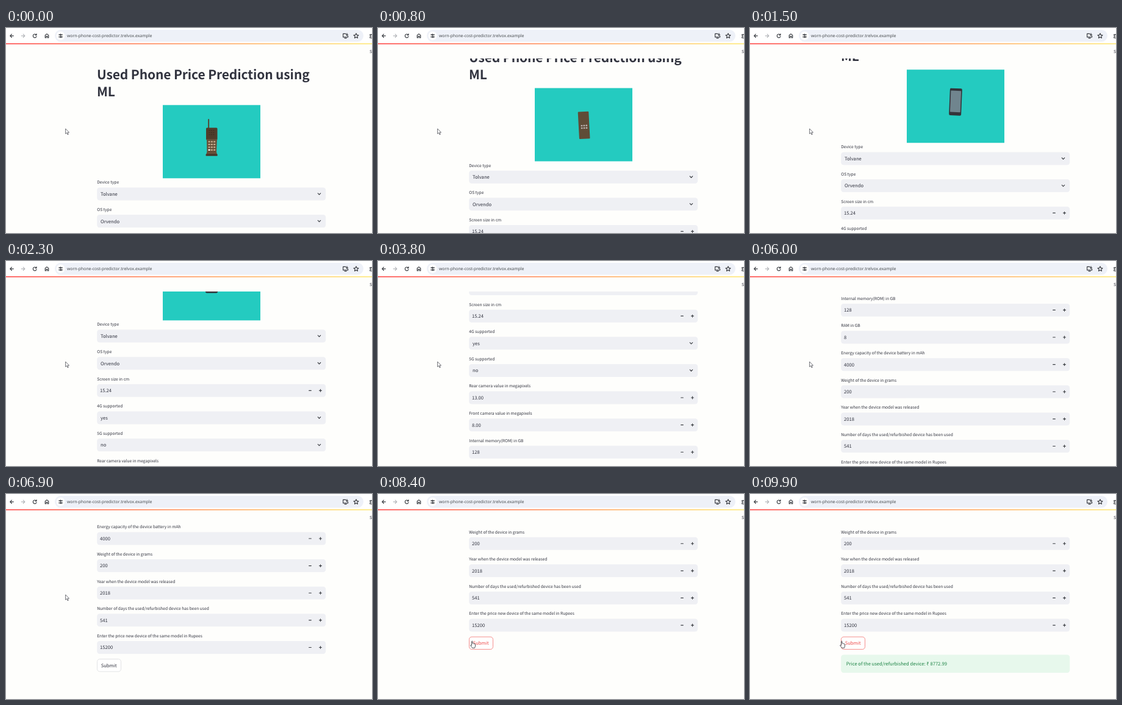
Write an HTML page that moves like this. It is 600 px wide and 336 px high and loops after 10000 ms.

```html
<!DOCTYPE html>
<html lang="en">
<head>
<meta charset="utf-8">
<title>Price form</title>
<style>
  html, body { margin: 0; width: 100%; height: 100%; overflow: hidden; background: #fefefc; }
  svg { display: block; width: 600px; height: 336px; }
  text {
    font-family: "Noto Sans CJK JP", "Noto Sans CJK SC", "Noto Sans CJK", "Noto Sans", sans-serif;
    text-rendering: geometricPrecision; fill: #31333f; white-space: pre;
  }
  .title { font-size: 20.98px; font-weight: 700; letter-spacing: -0.117px; }
  .label { font-size: 6.68px; }
  .value { font-size: 7.63px; }
  .url { font-family: "Open Sans", "Noto Sans", sans-serif; font-size: 6.9px; fill: #3c4043; }
  .icon { fill: none; stroke: #3a3d42; stroke-width: 1.15; stroke-linecap: round; stroke-linejoin: round; }
</style>
</head>
<body>
<svg id="stage" viewBox="0 0 600 336" xmlns="http://www.w3.org/2000/svg">
  <defs>
    <clipPath id="view"><rect y="50" width="600" height="286"/></clipPath>
    <linearGradient id="bar" gradientUnits="userSpaceOnUse" x1="0" x2="673">
      <stop offset="0" stop-color="#ff4b4b"/><stop offset="1" stop-color="#fffd80"/>
    </linearGradient>
  </defs>
  <rect width="600" height="336" fill="#fefefc"/>
  <g clip-path="url(#view)"><g id="page"></g></g>

  <rect width="600" height="25" fill="#fff"/>
  <rect y="25" width="600" height="1.6" fill="url(#bar)"/>
  <rect x="80" y="3" width="506" height="19.5" rx="9.7" fill="#eef1f8"/>
  <circle cx="89.5" cy="12.8" r="7" fill="#fff"/>
  <g class="icon">
    <path d="M12.3 12.8H6.8M9.4 10.1L6.7 12.8L9.4 15.5"/>
    <path stroke="#b4b6ba" d="M25.2 12.8H30.8M28.2 10.1L30.9 12.8L28.2 15.5"/>
    <path d="M49.6 11.2A2.9 2.9 0 1 0 50 13.8M50 9.6V11.6H48"/>
    <path d="M64.2 12L67 9.6L69.8 12V16H68.1V13.6H65.9V16H64.2Z"/>
    <path d="M86.6 11.1H88.2M90.6 11.1H92.6M86.6 14.6H88.6M91 14.6H92.6"/>
    <circle cx="89.4" cy="11.1" r="1"/><circle cx="89.8" cy="14.6" r="1"/>
    <path d="M557 9.4H552.6V14.9H560.6V13M555 16.6H558.2M559 8.8V12M557.5 10.8L559 12.3L560.5 10.8"/>
    <path d="M574 8.8L575.2 11.4L578 11.7L575.9 13.6L576.5 16.4L574 15L571.5 16.4L572.1 13.6L570 11.7L572.8 11.4Z"/>
    <path d="M601 10.6H596.8V12.2Q598.4 12.2 598.4 13.3T596.8 14.4V16.2H601"/>
  </g>
  <text class="url" x="100" y="15.2">worn-phone-cost-predictor.trelvox.example</text>
  <text class="label" x="596" y="40.9">Share</text>

  <path id="arrow" d="M0 0V8.4L2 6.7L3.4 9.9L4.7 9.3L3.3 6.2H5.9Z" fill="#fff" stroke="#44464c" stroke-width=".75"/>
  <path id="hand" d="M2.6 6.8V1.2Q3.3 0 4 1.2V4.5Q4.9 3.9 5.5 4.8Q6.4 4.3 7 5.2Q8.4 5 8.5 6.4V8.6Q8.3 10.4 7.5 11.9H3.6Q2.5 9.9 .5 8Q.4 6.6 2.6 7.8Z"
    fill="#fff" stroke="#26282e" stroke-width=".8"/>
</svg>
<script>
const $ = id => document.getElementById(id);
const page = $("page");

function add(tag, attrs, parent = page, text = "") {
  const node = document.createElementNS("http://www.w3.org/2000/svg", tag);
  for (const k in attrs) node.setAttribute(k, attrs[k]);
  if (text) node.textContent = text;
  parent.append(node);
  return node;
}
const write = (cls, x, y, text, parent) => add("text", { class: cls, x, y }, parent, text);
const box = (x, y, width, height, fill, rx = 0, parent = page) =>
  add("rect", { x, y, width, height, fill, rx }, parent);

write("title", 149, 84, "Used Phone Price Prediction using");
write("title", 149, 112.2, "ML");

// Picture with changing handsets
box(257, 126.3, 160, 120, "#24cbc0");
const [brick, slab, smart] = [0, 1, 2].map(() => add("g", {}));
const antenna = box(331.2, 149, 1.9, 16, "#55432f", .9, brick);
box(328, 163.5, 18.5, 20, "#4f3d2b", 1.5, brick);
add("path", { d: "M329 182H346L345 203L346.6 209.5H327.6L329.4 203Z", fill: "#665039" }, brick);
box(327.6, 206.5, 19, 3, "#46362a", 1, brick);
for (let i = 0; i < 9; i++)
  box(332.5 + i % 3 * 3.4, 167.5 + (i / 3 | 0) * 3.4, 2, 1, "#382b20", .5, brick);
for (let i = 0; i < 12; i++)
  box(331.6 + i % 3 * 4.3, 185.2 + (i / 3 | 0) * 4.5, 3, 2.3, i === 9 ? "#fff" : "#c9ad91", .6, brick);
box(328.8, 165, 17.6, 44.5, "#5f4c37", 1, slab);
for (let i = 0; i < 6; i++)
  box(332.6 + i % 3 * 3.9, 186.6 + (i / 3 | 0) * 4, 2.7, 2.4, "#b9b0ae", .6, slab);
box(327, 157, 20, 44.5, "#34343a", 2.2, smart);
box(328.6, 161, 16.8, 35, "#70858e", .5, smart);

// Form fields; a null mark means a drop-down
const GAP = 44.62;
const fields = [
  ["Device type", "Tolvane", 1], ["OS type", "Orvendo", 1],
  ["Screen size in cm", "15.24"], ["4G supported", "yes", 1], ["5G supported", "no", 1],
  ["Rear camera value in megapixels", "13.00"], ["Front camera value in megapixels", "8.00"],
  ["Internal memory(ROM) in GB", "128"], ["RAM in GB", "8"],
  ["Energy capacity of the device battery in mAh", "4000"],
  ["Weight of the device in grams", "200"],
  ["Year when the device model was released", "2018"],
  ["Number of days the used/refurbished device has been used", "541"],
  ["Enter the price new device of the same model in Rupees", "15200"]
];
fields.forEach(([label, value, select], i) => {
  const y = 272 + i * GAP;
  write("label", 149.2, y - 16.6, label);
  box(149.2, y - 10.5, 375, 21, "#eff0f4", 4.2);
  write("value", select ? 155 : 154, y + 2.9, value);
  add("path", {
    class: "icon",
    d: select ? `M511.3 ${y - 1.2}l2.2 2.3l2.2 -2.3` : `M496.7 ${y}h3.6M513.6 ${y}h3.8m-1.9 -1.9v3.8`
  });
});

const button = box(149.5, 871.2, 39, 20.4, "#fff", 4.2);
button.setAttribute("stroke-width", .7);
const submit = write("value", 155.7, 884.3, "Submit");
const result = add("g", {});
box(149.2, 900.4, 375, 29.6, "#e7f8ec", 4.2, result);
write("value", 157.8, 918, "Price of the used/refurbished device: ₹ 8772.99", result).style.fill = "#1d8345";

// Wheel notches: start, steps, scroll reached
const notches = [
  [700, 3, 32.5], [1500, 4, 103.5], [2200, 4, 174.5], [3100, 3, 245.5], [3800, 4, 316.5],
  [4500, 3, 387.8], [5200, 3, 458.5], [5900, 4, 529.5], [6600, 4, 600.6], [7400, 3, 637]
];
const ease = { 3: [.46, .856, 1], 4: [.36, .64, .92, 1], 5: [.1, .36, .66, .9, 1] };
const part = (t, start, n) => t < start ? 0 : ease[n][Math.min(n - 1, (t - start) / 100)];

function scrollAt(t) {
  let y = 0;
  for (const [start, n, to] of notches) y += (to - y) * part(t, start, n);
  return y;
}

const show = (node, on) => node.setAttribute("visibility", on ? "visible" : "hidden");
const turn = (node, deg, cy) => node.setAttribute("transform", `rotate(${deg} 337 ${cy})`);

function drawPhone(t) {
  show(brick, t < 600);
  show(slab, t >= 600 && t < 1300);
  show(smart, t >= 1300);
  const pull = Math.min(1, t / 500);
  antenna.setAttribute("y", 149 + 15 * pull);
  turn(brick, 2 * Math.sin(t / 100), 187);
  turn(slab, -3 * Math.cos((t - 800) / 130), 187);
  turn(smart, 3 * Math.sin((t - 2300) / 150), 179);
}

function draw(now) {
  const t = Math.floor(Math.max(0, now) % 10000 / 100) * 100;
  page.setAttribute("transform", `translate(0 ${-scrollAt(t)})`);
  drawPhone(t);

  const move = part(t, 8000, 5), over = t >= 8300;
  const drift = t >= 9900 ? 0 : t >= 9800 ? 2 : 4;
  $("arrow").setAttribute("transform", `translate(${97.6 + 54 * move} ${165 + 76 * move})`);
  $("hand").setAttribute("transform", `translate(${147 + drift - 54 * (1 - move)} ${240.4 - 76 * (1 - move)})`);
  show($("arrow"), !over);
  show($("hand"), over);

  const pressed = t === 8700;
  button.setAttribute("fill", pressed ? "#ff4b4b" : "#fff");
  button.setAttribute("stroke", over ? "#f2605e" : "#d6d7da");
  submit.style.fill = pressed ? "#fff" : over ? "#ee4a4a" : "";
  show(result, t >= 9200);
}

const start = performance.now();
function tick() {
  draw(performance.now() - start);
  requestAnimationFrame(tick);
}
tick();
</script>
</body>
</html>
```
